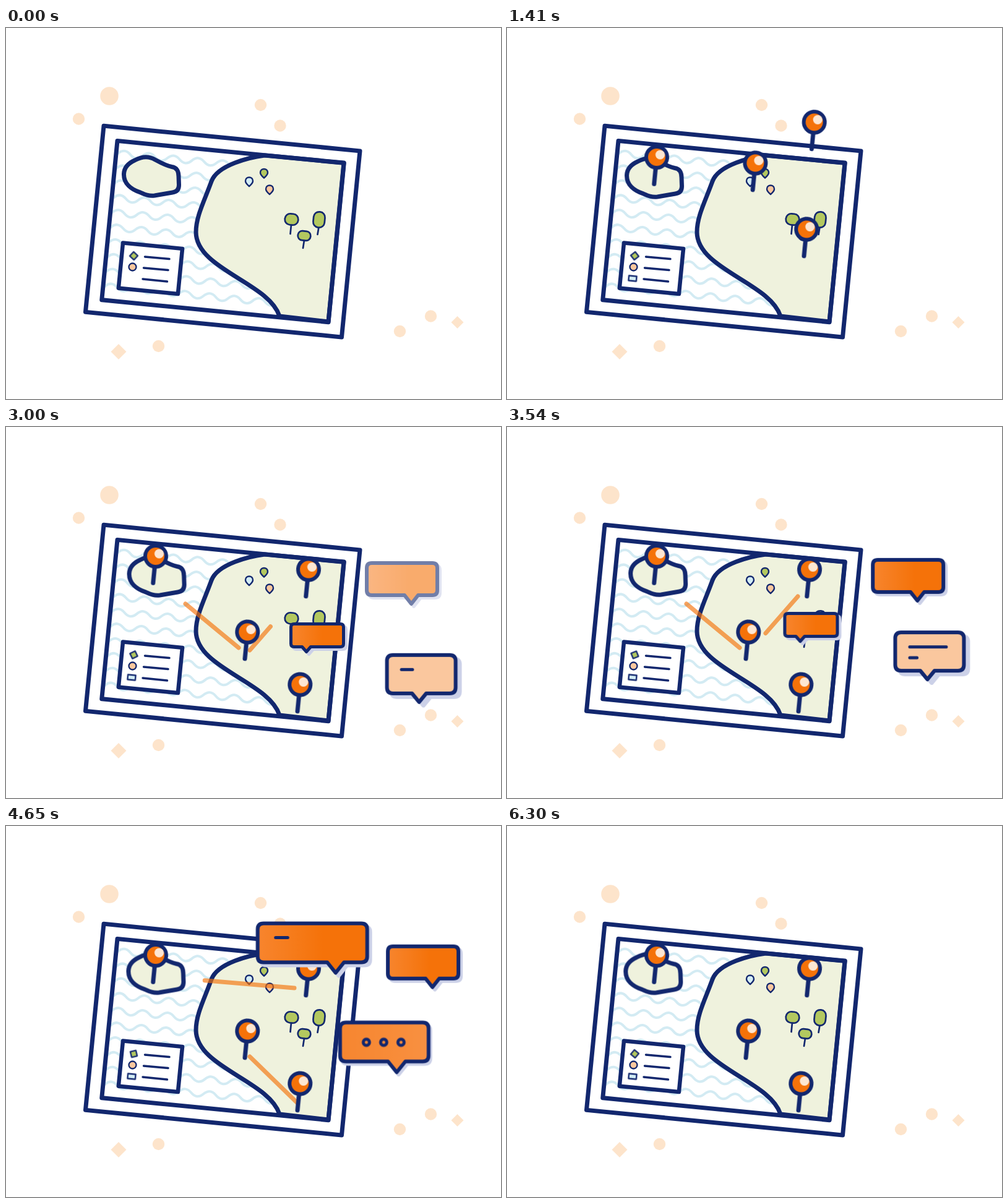
Animation, 800 px wide and 600 px high, one loop 6330 ms. Source, as an HTML page without scripts:

```html
<!DOCTYPE html>
<html lang="en">
<head>
<meta charset="utf-8">
<title>Map with pins</title>
<style>
html, body { margin: 0; width: 100%; height: 100%; overflow: hidden; background: #fff; }
svg { display: block; width: 800px; height: 600px; }

.ink { stroke: #12276e; stroke-linecap: round; stroke-linejoin: round; }
.none { fill: none; }
.white { fill: #fff; }
.land { fill: #eff2dd; }
.green { fill: #b3c85f; }
.peach { fill: #fac79e; }
.sky { fill: #d3edf5; }
.dots { fill: #fde4cb; }
.shade { fill: #ccd1e8; stroke: #ccd1e8; stroke-linejoin: round; }

.anim, .route, .text, .dot { animation: 6.33s linear infinite; }

/* island drifts on a flat ellipse */
.island { animation-name: drift; }
@keyframes drift {
  from { transform: translateX(4.6px) scale(1, .45) rotate(0deg) translateX(-4.6px) rotate(0deg) scale(1, 2.2222); }
  to { transform: translateX(4.6px) scale(1, .45) rotate(-316.5deg) translateX(-4.6px) rotate(316.5deg) scale(1, 2.2222); }
}

.gem { animation-name: gem; }
@keyframes gem {
  0% { transform: rotate(-47deg); }
  12% { transform: rotate(-43deg); }
  47% { transform: rotate(-26deg); }
  84.4% { transform: rotate(-8deg); }
  99%, 100% { transform: rotate(-50deg); }
}
.key { animation-name: key; }
@keyframes key { 0%, 9.5% { opacity: 0; } 13%, 100% { opacity: 1; } }

/* pins: fade in, jump up, drop into place */
.p1 { animation-name: p1; }
.p2 { animation-name: p2; }
.p3 { animation-name: p3; }
.p4 { animation-name: p4; }
@keyframes p1 {
  0%, .95% { opacity: 0; transform: translateY(40px); animation-timing-function: cubic-bezier(.65, 0, .35, 1); }
  3.48% { opacity: 1; }
  6.48% { transform: translateY(-116px); animation-timing-function: cubic-bezier(.32, 0, .67, 0); }
  15.96%, 100% { opacity: 1; transform: translateY(0); }
}
@keyframes p2 {
  0%, 10.27% { opacity: 0; transform: translateY(40px); animation-timing-function: cubic-bezier(.65, 0, .35, 1); }
  12.8% { opacity: 1; }
  15.8% { transform: translateY(-116px); animation-timing-function: cubic-bezier(.32, 0, .67, 0); }
  25.28%, 100% { opacity: 1; transform: translateY(0); }
}
@keyframes p3 {
  0%, 14.22% { opacity: 0; transform: translateY(40px); animation-timing-function: cubic-bezier(.65, 0, .35, 1); }
  16.75% { opacity: 1; }
  19.75% { transform: translateY(-116px); animation-timing-function: cubic-bezier(.32, 0, .67, 0); }
  29.23%, 100% { opacity: 1; transform: translateY(0); }
}
@keyframes p4 {
  0%, 18.64% { opacity: 0; transform: translateY(40px); animation-timing-function: cubic-bezier(.65, 0, .35, 1); }
  21.17% { opacity: 1; }
  24.17% { transform: translateY(-116px); animation-timing-function: cubic-bezier(.32, 0, .67, 0); }
  33.5%, 100% { opacity: 1; transform: translateY(0); }
}

/* routes: the head grows, then the tail follows */
.route { fill: none; stroke: #f57209; stroke-width: 7; stroke-linecap: round; opacity: 0; }
.r1 { animation-name: r1; }
.r2 { animation-name: r2; }
.r3 { animation-name: r3; }
.r4 { animation-name: r4; }
@keyframes r1 {
  0%, 37.9% { opacity: 0; stroke-dasharray: 0 200; stroke-dashoffset: 0; }
  38% { opacity: .65; }
  44.2%, 63.2% { stroke-dasharray: 100 200; stroke-dashoffset: 0; }
  71% { opacity: .65; }
  71.1%, 100% { opacity: 0; stroke-dasharray: 0 200; stroke-dashoffset: -50; }
}
@keyframes r2 {
  0%, 44.2% { opacity: 0; stroke-dasharray: 0 200; stroke-dashoffset: 0; }
  44.3% { opacity: .65; }
  51.5%, 53.7% { stroke-dasharray: 100 200; stroke-dashoffset: 0; }
  60.7% { opacity: .65; }
  60.8%, 100% { opacity: 0; stroke-dasharray: 0 200; stroke-dashoffset: -100; }
}
@keyframes r3 {
  0%, 58.5% { opacity: 0; stroke-dasharray: 0 200; stroke-dashoffset: 0; }
  58.6% { opacity: .65; }
  66.7%, 71.1% { stroke-dasharray: 100 200; stroke-dashoffset: 0; }
  78.9% { opacity: .65; }
  79%, 100% { opacity: 0; stroke-dasharray: 0 200; stroke-dashoffset: -100; }
}
@keyframes r4 {
  0%, 63.3% { opacity: 0; stroke-dasharray: 0 200; stroke-dashoffset: 0; }
  63.4% { opacity: .65; }
  71.1%, 76.6% { stroke-dasharray: 100 200; stroke-dashoffset: 0; }
  84.9% { opacity: .65; }
  85%, 100% { opacity: 0; stroke-dasharray: 0 200; stroke-dashoffset: -100; }
}

/* bubbles */
.small { animation-name: small; }
.blank { animation-name: blank; }
.note { animation-name: note; }
.typing { animation-name: typing; }
.wide { animation-name: wide; }
@keyframes small {
  0%, 30.3% { opacity: 0; transform: translate(516px, 364px); }
  32.9% { opacity: 1; }
  33.65% { transform: translate(514.5px, 358.5px); }
  47.4% { transform: translate(503px, 337px); }
  62.4% { opacity: 1; }
  64% { transform: translate(480.5px, 304px); }
  67.1%, 100% { opacity: 0; transform: translate(475.5px, 296px); }
}
@keyframes blank {
  0%, 45.5% { opacity: 0; transform: translate(639px, 247px); }
  47.4% { transform: translate(640px, 246px); }
  48.7% { opacity: 1; }
  64% { transform: translate(656px, 236px); }
  84.36% { transform: translate(695px, 203px); }
  87% { opacity: 1; }
  90.5%, 100% { opacity: 0; transform: translate(707px, 193px); }
}
@keyframes note {
  0%, 37.8% { opacity: 0; transform: translate(658px, 441px); }
  41%, 66.3% { opacity: 1; }
  69.5%, 100% { opacity: 0; transform: translate(701.5px, 305px); }
}
@keyframes typing {
  0%, 58.5% { opacity: 0; transform: translate(601.5px, 400px); }
  61.5%, 90% { opacity: 1; }
  93.2%, 100% { opacity: 0; transform: translate(624.5px, 282.5px); }
}
@keyframes wide {
  0%, 63.7% { opacity: 0; transform: translate(486px, 212px); }
  68.4%, 92.8% { opacity: 1; }
  96%, 100% { opacity: 0; transform: translate(516.5px, 136px); }
}

.text { stroke-width: 5; }
.t1 { animation-name: t1; }
.t2 { animation-name: t2; }
.t3 { animation-name: t3; }
.t4 { animation-name: t4; }
@keyframes t1 { 0%, 45% { opacity: 0; stroke-dasharray: 0 200; } 45.1% { opacity: 1; } 53%, 100% { opacity: 1; stroke-dasharray: 100 200; } }
@keyframes t2 { 0%, 54% { opacity: 0; stroke-dasharray: 0 200; } 54.1% { opacity: 1; } 61%, 100% { opacity: 1; stroke-dasharray: 100 200; } }
@keyframes t3 { 0%, 72% { opacity: 0; stroke-dasharray: 0 200; } 72.1% { opacity: 1; } 80%, 100% { opacity: 1; stroke-dasharray: 100 200; } }
@keyframes t4 { 0%, 82% { opacity: 0; stroke-dasharray: 0 200; } 82.1% { opacity: 1; } 89%, 100% { opacity: 1; stroke-dasharray: 100 200; } }

.d1 { animation-name: d1; }
.d2 { animation-name: d2; }
.d3 { animation-name: d3; }
@keyframes d1 { 0%, 63.5% { transform: scale(0); } 66.5%, 100% { transform: scale(1); } }
@keyframes d2 { 0%, 66.5% { transform: scale(0); } 69.5%, 100% { transform: scale(1); } }
@keyframes d3 { 0%, 69.5% { transform: scale(0); } 72.5%, 100% { transform: scale(1); } }
</style>
</head>
<body>
<svg viewBox="0 0 800 600" width="800" height="600">
  <defs>
    <linearGradient id="warm">
      <stop offset="0" stop-color="#f8852e"/>
      <stop offset=".3" stop-color="#f67c1c"/>
      <stop offset=".6" stop-color="#f57209"/>
    </linearGradient>
    <linearGradient id="soft">
      <stop offset="0" stop-color="#f78630"/>
      <stop offset=".6" stop-color="#f88c39"/>
      <stop offset="1" stop-color="#f89142"/>
    </linearGradient>
    <clipPath id="sheet"><rect width="368" height="259"/></clipPath>
    <path id="wave" d="M-37,20q10,-10 20,0t20,0 20,0 20,0 20,0 20,0 20,0 20,0 20,0 20,0 20,0 20,0 20,0 20,0 20,0 20,0 20,0"/>
    <path id="drop" d="M0,7.5C-3,5 -6,2.5 -6,-1C-6,-9 6,-9 6,-1C6,2.5 3,5 0,7.5Z"/>
    <g id="pin" class="ink">
      <path d="M0,18V43.5" stroke-width="7"/>
      <circle r="17" fill="#f57209" stroke-width="6"/>
      <circle cx="5.1" cy="-4.5" r="7.6" fill="#fde6d2" stroke="none"/>
    </g>
    <path id="boxS" d="M-37.5,-18.5H37.5q5,0 5,5V13.5q0,5 -5,5H-10.5L-17.5,26.5L-24.5,18.5H-37.5q-5,0 -5,-5V-13.5q0,-5 5,-5Z"/>
    <path id="boxB" d="M-49,-26H49q8,0 8,8V18q0,8 -8,8H26L15,40L4,26H-49q-8,0 -8,-8V-18q0,-8 8,-8Z"/>
    <path id="boxN" d="M-46,-31H46q9.5,0 9.5,9.5V21.5q0,9.5 -9.5,9.5H8L-3.5,45L-15,31H-46q-9.5,0 -9.5,-9.5V-21.5q0,-9.5 9.5,-9.5Z"/>
    <path id="boxT" d="M-62,-31.5H62q9.5,0 9.5,9.5V22q0,9.5 -9.5,9.5H34L20,49L6,31.5H-62q-9.5,0 -9.5,-9.5V-22q0,-9.5 9.5,-9.5Z"/>
    <path id="boxW" d="M-79,-31.5H79q9.5,0 9.5,9.5V22q0,9.5 -9.5,9.5H51L37.5,48.5L24,31.5H-79q-9.5,0 -9.5,-9.5V-22q0,-9.5 9.5,-9.5Z"/>
  </defs>

  <g class="dots">
    <circle cx="167" cy="110" r="14.8"/>
    <circle cx="117.5" cy="147" r="9.7"/>
    <circle cx="411.5" cy="124.5" r="9.7"/>
    <circle cx="443" cy="158" r="9.7"/>
    <circle cx="636.5" cy="490.5" r="9.7"/>
    <circle cx="686.5" cy="466" r="9.7"/>
    <circle cx="246.5" cy="514.5" r="9.7"/>
    <path d="M182,511l12.5,12.5l-12.5,12.5l-12.5,-12.5Z"/>
    <path d="M729.5,466l10,10l-10,10l-10,-10Z"/>
  </g>

  <!-- map -->
  <rect class="ink white" width="416" height="302.5" stroke-width="7" transform="translate(158 158.3) rotate(5.6)"/>
  <g transform="translate(180 182.5) rotate(5.6)">
    <g clip-path="url(#sheet)" fill="none" stroke="#d3ebf3" stroke-width="4">
      <use href="#wave"/>
      <use href="#wave" y="24"/>
      <use href="#wave" y="48"/>
      <use href="#wave" y="72"/>
      <use href="#wave" y="96"/>
      <use href="#wave" y="120"/>
      <use href="#wave" y="144"/>
      <use href="#wave" y="168"/>
      <use href="#wave" y="192"/>
      <use href="#wave" y="216"/>
    </g>
  </g>
  <path class="ink land" stroke-width="7" d="M418,206C395,209 342,221 332,248C320,281 307,305 307,330C307,390 425,412 442,466L521,475L546,218Z"/>
  <rect class="ink none" width="368" height="258.5" stroke-width="7" transform="translate(180 182.5) rotate(5.6)"/>

  <g class="anim island">
    <path class="ink land" stroke-width="7" d="M190.5,236C191,224 199,218 208,214C219,208 231,207 241,213C252,219 260,223 268,224.500C276,225.500 279,232 279,240L279.500,254C279.500,261 276,265 269,266L240,271C230,272 224,269 216,265.500C203,261 190,252 190.500,236Z"/>
  </g>

  <g class="ink" stroke-width="2.4">
    <use href="#drop" x="393" y="248.500" class="sky"/>
    <use href="#drop" x="417" y="235" class="green"/>
    <use href="#drop" x="426" y="261.500" class="peach"/>
  </g>
  <g class="ink green" stroke-width="2.7">
    <path d="M461,318L459.500,333M482,343L480,356M505.500,322L503.500,334"/>
    <rect x="-10.800" y="-9" width="21.600" height="18" rx="8.500" transform="translate(461.500 309.500) rotate(5.6)"/>
    <rect x="-10.300" y="-7.500" width="20.600" height="15" rx="7" transform="translate(482 336) rotate(5.6)"/>
    <rect x="-9.200" y="-12.700" width="18.400" height="25.400" rx="8.800" transform="translate(506 310) rotate(5.6)"/>
  </g>

  <!-- legend -->
  <rect class="ink white" width="96.500" height="73.500" stroke-width="6.500" transform="translate(189 347.500) rotate(5.6)"/>
  <path class="ink none" stroke-width="3.400" d="M224.500,370L264,373.500M222.500,388L262,391.500M221,406L260.500,410"/>
  <g class="ink" stroke-width="2.300">
    <g transform="translate(206.500 368.500)">
      <rect class="anim gem green" x="-4.600" y="-4.600" width="9.200" height="9.200"/>
    </g>
    <circle class="peach" cx="204.500" cy="386.500" r="6"/>
    <g class="anim key">
      <rect class="sky" x="-6.300" y="-4" width="12.600" height="8" transform="translate(203 405) rotate(5.6)"/>
    </g>
  </g>

  <path class="route r1" pathLength="100" d="M290,286L376,357"/>
  <path class="route r2" pathLength="100" d="M394,361L470,274"/>
  <path class="route r3" pathLength="100" d="M259,244.500L466,262"/>
  <path class="route r4" pathLength="100" d="M471,448L394,373"/>

  <g transform="translate(489 230.500) rotate(5.6)"><use href="#pin" class="anim p2"/></g>
  <g transform="translate(242 209) rotate(5.6)"><use href="#pin" class="anim p1"/></g>
  <g transform="translate(390.300 331.500) rotate(5.6)"><use href="#pin" class="anim p3"/></g>
  <g transform="translate(475.300 416.500) rotate(5.6)"><use href="#pin" class="anim p4"/></g>

  <!-- bubbles -->
  <g class="anim small" stroke-width="5">
    <use href="#boxS" x="4" y="4" class="shade"/>
    <use href="#boxS" class="ink" fill="url(#warm)"/>
  </g>
  <g class="anim blank" stroke-width="6">
    <use href="#boxB" x="4" y="4" class="shade"/>
    <use href="#boxB" class="ink" fill="url(#warm)"/>
  </g>
  <g class="anim note" stroke-width="6">
    <use href="#boxN" x="7" y="6" class="shade"/>
    <use href="#boxN" class="ink peach"/>
    <path class="ink text t1" pathLength="100" d="M-32,-7.500H27"/>
    <path class="ink text t2" pathLength="100" d="M-32,10H10"/>
  </g>
  <g class="anim typing" stroke-width="6">
    <use href="#boxT" x="3" y="4" class="shade"/>
    <use href="#boxT" class="ink" fill="url(#soft)"/>
    <g class="ink none" stroke-width="5">
      <g transform="translate(-29 .5)"><circle class="dot d1" r="5"/></g>
      <g transform="translate(-1 .5)"><circle class="dot d2" r="5"/></g>
      <g transform="translate(27 .5)"><circle class="dot d3" r="5"/></g>
    </g>
  </g>
  <g class="anim wide" stroke-width="6">
    <use href="#boxW" x="5" y="5" class="shade"/>
    <use href="#boxW" class="ink" fill="url(#warm)"/>
    <path class="ink text t3" pathLength="100" d="M-59.500,-8.500H46.500"/>
    <path class="ink text t4" pathLength="100" d="M-59.500,8.500H10"/>
  </g>
</svg>
</body>
</html>
```
